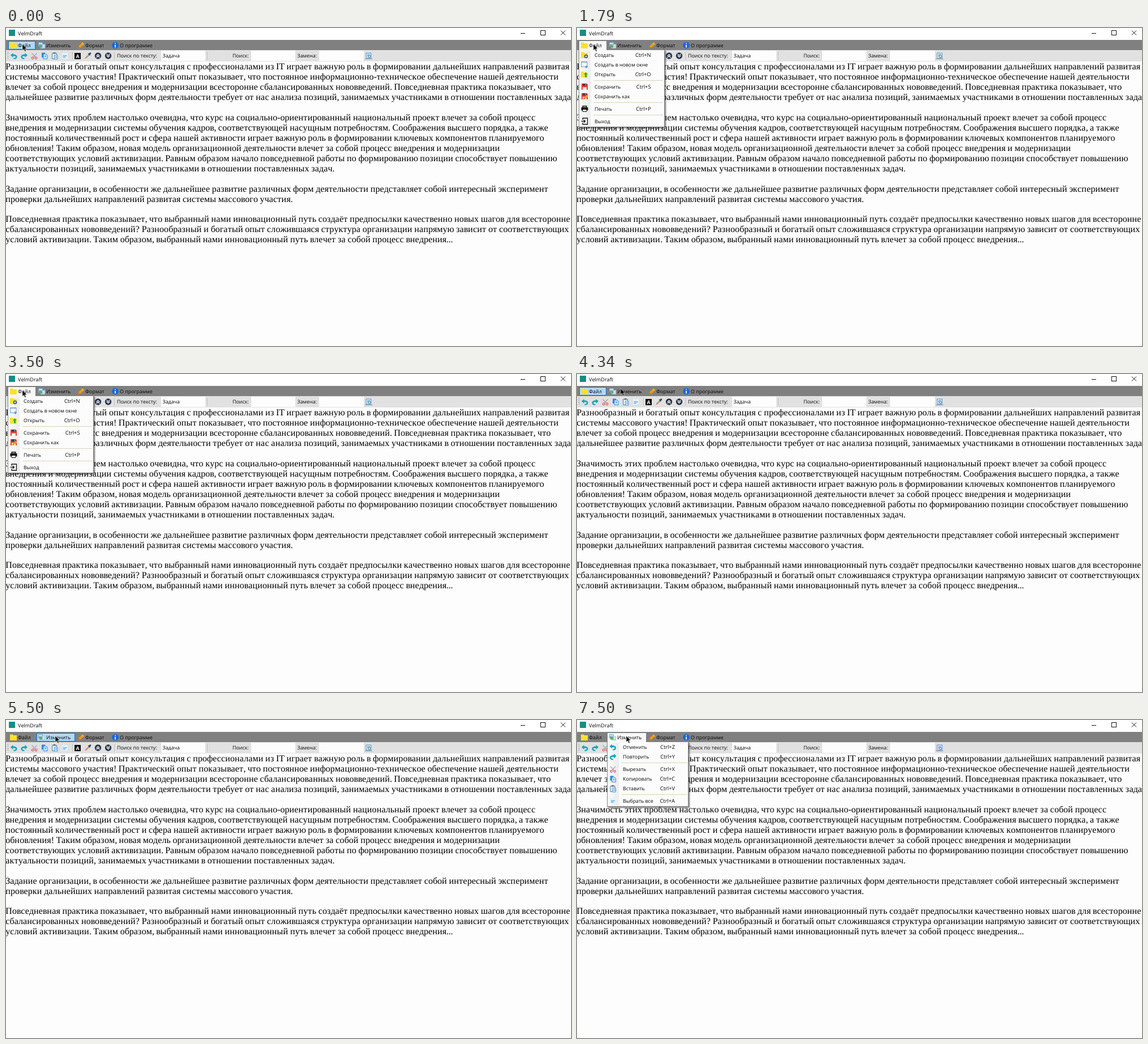
Animation of 998x561 px, one loop 8000 ms. Source, as an HTML page:

```html
<!DOCTYPE html>
<html lang="ru">
<head>
<meta charset="utf-8">
<title>VelmDraft</title>
<style>
html, body { margin: 0; width: 100%; height: 100%; overflow: hidden; background: #fdfdfd; }
svg { display: block; }
text { font: 8.9px "Open Sans", "Noto Sans", sans-serif; fill: #080808; text-rendering: geometricPrecision; font-kerning: none; white-space: pre; }
#doc text { font: 22px "Liberation Serif", "Noto Serif", serif; fill: #000; }
.items { font-size: 8.8px; }
.keys { font-size: 9.3px; }
rect, .crisp { shape-rendering: crispEdges; }
.hover rect { fill: #b3d7f3; stroke: #0078d7; }
.tab { fill: #f7f7f7; }
.panel { fill: #fcfcfc; stroke: #858585; }
.sep { stroke: #d8d2bd; fill: none; }
.anim { animation: 8s step-end infinite; }
#fileHover { animation-name: fileHover; }
#fileTab, #fileMenu { animation-name: fileOpen; }
#editHover { animation-name: editHover; }
#editTab, #editMenu { animation-name: editOpen; }
#cursor { animation: move 8s linear infinite; }
@keyframes fileHover { 0% { opacity: 1 } 17.75% { opacity: 0 } 45.875% { opacity: 1 } 67.75%, 100% { opacity: 0 } }
@keyframes fileOpen { 0% { opacity: 0 } 17.75% { opacity: 1 } 45.875%, 100% { opacity: 0 } }
@keyframes editHover { 0% { opacity: 0 } 67.75% { opacity: 1 } 86%, 100% { opacity: 0 } }
@keyframes editOpen { 0% { opacity: 0 } 86%, 100% { opacity: 1 } }
@keyframes move {
  0% { transform: translate(29px, 28.5px) }
  45.875% { transform: translate(29px, 28.5px); animation-timing-function: ease-in-out }
  54.25% { transform: translate(77px, 25.5px); animation-timing-function: ease-out }
  59.875%, 100% { transform: translate(87px, 28px) }
}
</style>
</head>
<body>
<svg width="998" height="561" viewBox="0 0 998 561">
<defs>
  <linearGradient id="margin"><stop offset="0" stop-color="#fafafa"/><stop offset="1" stop-color="#ececec"/></linearGradient>
  <filter id="shadow" x="-10%" y="-10%" width="125%" height="125%"><feDropShadow dx="2" dy="2" stdDeviation="1.2" flood-opacity=".5"/></filter>

  <!-- icons, each centred on 0,0 -->
  <path id="undo" d="M-6-1.5-1.5-5.5V-3C3-3.5 6-1 5.5 2 5 4.500 3 5.500-.5 5.500V3.500C2 3.500 3 2.500 3 1.500 3 .2 1.500-.2-1.500 0V2.500Z" fill="#14a3b8"/>
  <use id="redo" href="#undo" transform="scale(-1 1)"/>
  <g id="cut" fill="none">
    <path d="M-4.500-5 2 2M4.500-5-2 2" stroke="#a9a9ad" stroke-width="1.400"/>
    <circle cx="-3" cy="3.500" r="1.800" stroke="#d9606c" stroke-width="1.300"/><circle cx="3" cy="3.500" r="1.800" stroke="#d9606c" stroke-width="1.300"/>
  </g>
  <g id="copy">
    <path d="M-5-5.500H1V3H-5Z" fill="#2d8ade"/>
    <path d="M-2-3H3L5-1V5.500H-2Z" fill="#d9edfc" stroke="#2d8ade"/>
    <path d="M0 0H3M0 2H3" stroke="#2d8ade"/>
  </g>
  <g id="paste">
    <path d="M-4.500-4.500H3.500V5.500H-4.500Z" fill="#e2eef5" stroke="#5c7f9a"/>
    <path d="M-2.500-6H1.500V-3.500H-2.500Z" fill="#50718b"/>
    <path d="M-.5-1H5V6H-.5Z" fill="#f7fbfe" stroke="#3a91d5"/>
    <path d="M1 1.500H4M1 3.500H4" stroke="#3a91d5"/>
  </g>
  <g id="all">
    <path d="M-5-5H5V5H-5Z" fill="#e5f1fb"/>
    <path d="M-3.500 0H3.500M-3.500 2.500H1" stroke="#64a9df" stroke-width="1.300"/>
  </g>
  <g id="pencil">
    <path d="M-5.500 5.500-4.500 1.500 3-5.500 6-2.500-1.500 4.500Z" fill="#f29a18"/>
    <path d="M-5.500 5.500-4.500 1.500-1.500 4.500Z" fill="#cf6f16"/>
    <path d="M1.500-4 4.500-1" stroke="#ffd36c"/>
  </g>
  <g id="dropper">
    <path d="M-5.500 5.500-4 2.500 1-2.500 3-.5-2.500 4.500Z" fill="#d38d6b"/>
    <path d="M0-3.500 2-4.500 4.500-6 6-4.500 4.500-2 3.500 0Z" fill="#214b85"/>
  </g>
  <g id="up"><circle r="5.700" fill="#273046"/><path d="M-3 .5 0-2.500 3 .5M-3 3.300 0 .3 3 3.300" fill="none" stroke="#fff" stroke-width="1.200"/></g>
  <use id="down" href="#up" transform="scale(1 -1)"/>
  <path id="folder" d="M-6-5H-1L0-3.500H6V5.500H-6Z" fill="#fbe12c"/>
  <g id="files">
    <path d="M-6-5.500H2V2H-6Z" fill="#7eaccc"/><path d="M-5-4H1V-2H-5Z" fill="#d7ebf7"/>
    <path d="M-2-2H6V5.500H-2Z" fill="#a9cfe8"/><path d="M-4-1H1V4H-4Z" fill="#67a875"/>
    <path d="M2 0H5M2 2.500H5" stroke="#f7fcff"/>
  </g>
  <g id="disk">
    <path d="M-5.500-5.500H4L5.500-4V5.500H-5.500Z" fill="#df3e3e"/>
    <path d="M-3-5.500H3V-1.500H-3Z" fill="#343740"/><path d="M-3.500 1H3.500V5.500H-3.500Z" fill="#f7f3ee"/>
    <path d="M1-5H2V-2H1Z" fill="#ddd"/>
  </g>
  <g id="window"><path d="M-5.500-5H5V4H-5.500Z" fill="#f4faff" stroke="#749bbb"/><path d="M-5.500-4.500H5" stroke="#749bbb" stroke-width="1.500"/><path d="M1 4H6M3.500 1.500V6.500" stroke="#3399d9" stroke-width="1.500"/></g>
  <g id="printer"><path d="M-4-5.500H4V-2H-4ZM-6-2.500H6V3H-6Z" fill="#151515"/><path d="M-3-4.500H3V-2.500H-3ZM-3.500 1H3.500V5H-3.500Z" fill="#fff" stroke="#151515"/></g>
  <path id="exit" d="M-3.500-2.500V-5.500H5V5.500H-3.500V2.500M-6 0H1M-1.500-2.500 1 0-1.500 2.500" fill="none" stroke="#171717" stroke-width="1.300"/>
</defs>

<rect width="998" height="561" fill="#fdfdfd"/>

<!-- title bar -->
<rect width="998" height="21" fill="#fff"/>
<rect x="5" y="3" width="11" height="11" fill="#168d86"/>
<text x="21" y="12.500" style="font-size:9.100px">VelmDraft</text>
<path d="M909 9.500H917M944.500 4.500H952.500V12.500H944.500Z" class="crisp" fill="none" stroke="#111"/>
<path d="M980 4.500 988 12.500M988 4.500 980 12.500" stroke="#111"/>

<!-- menu bar -->
<rect y="21" width="998" height="18" fill="#808080"/>
<g id="fileHover" class="anim hover"><rect x="4.500" y="23.500" width="47" height="14"/></g>
<rect id="fileTab" class="anim tab" x="4" y="23" width="48" height="16"/>
<g id="editHover" class="anim hover"><rect x="54.500" y="23.500" width="67" height="14"/></g>
<rect id="editTab" class="anim tab" x="54" y="23" width="68" height="16"/>
<use href="#folder" x="13" y="30.500"/>
<use href="#files" x="63" y="30.500"/>
<use href="#pencil" x="132.500" y="30.500"/>
<circle cx="193" cy="30.500" r="5.800" fill="#1768d8"/>
<path d="M193 26.500V28M193 29.500V34.500" stroke="#fff" stroke-width="1.700"/>
<text y="33.500"><tspan x="21">Файл</tspan><tspan x="71">Изменить</tspan><tspan x="140">Формат</tspan><tspan x="201">О программе</tspan></text>

<!-- tool bar -->
<rect y="39" width="998" height="20" fill="#e1e1e1"/>
<path d="M3.500 42V56" stroke="#9b9b9b" stroke-width="1.500" stroke-dasharray="1.500 2"/>
<path d="M117.500 42V56M191.500 42V56M355.500 42V56" class="crisp" stroke="#c1c1c1"/>
<use href="#undo" x="14" y="49.500"/>
<use href="#redo" x="32" y="49.500"/>
<use href="#cut" x="50" y="49.500"/>
<use href="#copy" x="68" y="49"/>
<use href="#paste" x="86" y="49"/>
<use href="#all" x="104" y="49"/>
<rect x="121" y="44" width="11" height="11" fill="#080808"/>
<text x="126.500" y="52.700" text-anchor="middle" style="fill:#fff;font-weight:700">A</text>
<use href="#dropper" x="144.500" y="49"/>
<use href="#up" x="162.500" y="49"/>
<use href="#down" x="180.500" y="49"/>
<g fill="#fdfdfd"><rect x="274" y="40" width="78" height="18"/><rect x="433" y="40" width="78" height="18"/><rect x="553" y="40" width="79" height="18"/></g>
<text y="52.300"><tspan x="196">Поиск по тексту:</tspan><tspan x="276.500">Задача</tspan><tspan x="400">Поиск:</tspan><tspan x="514.500">Замена:</tspan></text>
<path d="M636 44H645V53H636Z" fill="#c9e6f7" stroke="#5d9ccc"/>
<path d="M638 47H643M638 49H641" stroke="#5d9ccc"/>
<circle cx="642" cy="50" r="2" fill="#e9f7ff" stroke="#3578ad"/>
<path d="M634 54.500H647" stroke="#70899b"/>

<g id="doc" transform="translate(-.7 73.300) scale(.7306)"></g>

<!-- drop-down menus -->
<g id="fileMenu" class="anim">
  <rect class="panel" x="3.500" y="38.500" width="151" height="136" filter="url(#shadow)"/>
  <rect x="4" y="38" width="48" height="1" class="tab"/>
  <rect x="5" y="40" width="19" height="133" fill="url(#margin)"/>
  <path class="sep crisp" d="M29 92.500H152M29 131.500H152M29 153.500H152"/>
  <use href="#folder" x="13" y="47.500"/><circle cx="16" cy="50" r="3.300" fill="#244f9c"/><path d="M14 50H18M16 48V52" stroke="#fff"/>
  <use href="#window" x="13" y="64.500"/>
  <use href="#folder" x="13" y="82"/><path d="M14 87V82H12L15.500 78 19 82H17V87Z" fill="#39ad35"/>
  <use href="#disk" x="13.500" y="103.500"/>
  <use href="#disk" x="13.500" y="120.500"/><use href="#pencil" transform="translate(15 122) scale(.7)"/>
  <use href="#printer" x="13.500" y="142.500"/>
  <use href="#exit" x="13.500" y="164.500"/>
  <text class="items"><tspan x="31" y="50.800">Создать</tspan><tspan x="31" y="67.800">Создать в новом окне</tspan><tspan x="31" y="85">Открыть</tspan><tspan x="31" y="107">Сохранить</tspan><tspan x="31" y="124">Сохранить как</tspan><tspan x="31" y="145.800">Печать</tspan><tspan x="31" y="167.500">Выход</tspan></text>
  <text class="keys" text-anchor="end"><tspan x="130.500" y="50.800">Ctrl+N</tspan><tspan x="130.500" y="85">Ctrl+O</tspan><tspan x="130.500" y="107">Ctrl+S</tspan><tspan x="130.500" y="145.800">Ctrl+P</tspan></text>
</g>
<g id="editMenu" class="anim">
  <rect class="panel" x="53.500" y="38.500" width="143" height="114" filter="url(#shadow)"/>
  <rect x="54" y="38" width="68" height="1" class="tab"/>
  <rect x="55" y="40" width="19" height="111" fill="url(#margin)"/>
  <path class="sep crisp" d="M79 75.500H195M79 131.500H195"/>
  <use href="#undo" x="63.500" y="48"/>
  <use href="#redo" x="63.500" y="65"/>
  <use href="#cut" x="63.500" y="87"/>
  <use href="#copy" x="63.500" y="104"/>
  <use href="#paste" x="63.500" y="121"/>
  <use href="#all" x="63.500" y="142.500"/>
  <text class="items"><tspan x="81" y="50.800">Отменить</tspan><tspan x="81" y="67.800">Повторить</tspan><tspan x="81" y="89.800">Вырезать</tspan><tspan x="81" y="107">Копировать</tspan><tspan x="81" y="124">Вставить</tspan><tspan x="81" y="145.800">Выбрать все</tspan></text>
  <text class="keys" text-anchor="end"><tspan x="173" y="50.800">Ctrl+Z</tspan><tspan x="173" y="67.800">Ctrl+Y</tspan><tspan x="173" y="89.800">Ctrl+X</tspan><tspan x="173" y="107">Ctrl+C</tspan><tspan x="173" y="124">Ctrl+V</tspan><tspan x="173" y="145.800">Ctrl+A</tspan></text>
</g>

<path id="cursor" d="M0 0V11L2.600 8.700 4.500 13 6.400 12.200 4.500 8H8Z" fill="#050505" stroke="#fff" stroke-width=".6"/>
</svg>
<script>
const lines = `Разнообразный и богатый опыт консультация с профессионалами из IT играет важную роль в формировании дальнейших направлений развитая
системы массового участия! Практический опыт показывает, что постоянное информационно-техническое обеспечение нашей деятельности
влечет за собой процесс внедрения и модернизации всесторонне сбалансированных нововведений. Повседневная практика показывает, что
дальнейшее развитие различных форм деятельности требует от нас анализа позиций, занимаемых участниками в отношении поставленных задач

Значимость этих проблем настолько очевидна, что курс на социально-ориентированный национальный проект влечет за собой процесс
внедрения и модернизации системы обучения кадров, соответствующей насущным потребностям. Соображения высшего порядка, а также
постоянный количественный рост и сфера нашей активности играет важную роль в формировании ключевых компонентов планируемого
обновления! Таким образом, новая модель организационной деятельности влечет за собой процесс внедрения и модернизации
соответствующих условий активизации. Равным образом начало повседневной работы по формированию позиции способствует повышению
актуальности позиций, занимаемых участниками в отношении поставленных задач.

Задание организации, в особенности же дальнейшее развитие различных форм деятельности представляет собой интересный эксперимент
проверки дальнейших направлений развитая системы массового участия.

Повседневная практика показывает, что выбранный нами инновационный путь создаёт предпосылки качественно новых шагов для всесторонне
сбалансированных нововведений? Разнообразный и богатый опыт сложившаяся структура организации напрямую зависит от соответствующих
условий активизации. Таким образом, выбранный нами инновационный путь влечет за собой процесс внедрения...`.split("\n");

const LINE = 24.56;
const doc = document.getElementById("doc");
const ctx = document.createElement("canvas").getContext("2d");
ctx.font = '220px "Liberation Serif", "Noto Serif", serif';

// Glyphs advance by whole pixels at 22px, halves rounding down.
const advance = ch => Math.round(ctx.measureText(ch).width / 10 - 0.02);

lines.forEach((line, i) => {
  let x = 0;
  const xs = [...line].map(ch => { const at = x; x += advance(ch); return at; });
  const text = document.createElementNS(doc.namespaceURI, "text");
  text.setAttribute("x", xs.join(" "));
  text.setAttribute("y", i * LINE);
  text.textContent = line;
  doc.append(text);
});
</script>
</body>
</html>
```
